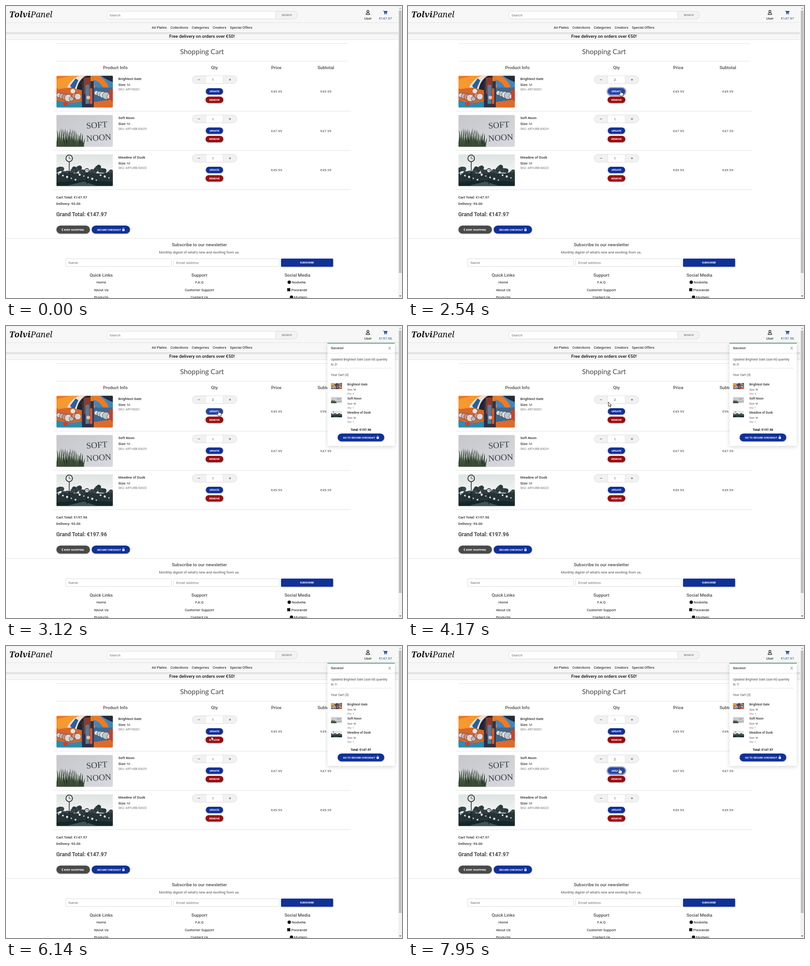
Animation of 871 by 643 pixels, one loop 8000 ms. Source, as an HTML page:

```html
<!DOCTYPE html>
<html lang="en">
<head>
<meta charset="utf-8">
<title>Shopping cart</title>
<style>
html, body { margin: 0; width: 100%; height: 100%; overflow: hidden; background: #fff; }
svg { display: block; }
#stage { width: 871px; height: 643px; }
text { font-family: Roboto, sans-serif; fill: #4a4a4a; }
.b { font-weight: 700; }
.m { font-weight: 500; }
.k { fill: #111; }
.s { fill: #777; }
.w { fill: #fff; font-weight: 700; }
.link { fill: #1b50a6; }
.lift { filter: drop-shadow(0 1px 1.2px rgba(0, 0, 0, .35)); }
.blue { fill: #10309a; }
.red { fill: #9c0a0c; }
.blue.hot { fill: #2446a6; }
.red.hot { fill: #8a0709; }
.blue.ring { fill: #2446a6; stroke: #8b9bd0; stroke-width: 4.4; paint-order: stroke; }
.step { fill: #f1f1f1; }
.step.hot { fill: #dedede; }
.toast { filter: drop-shadow(0 2px 4px rgba(0, 0, 0, .16)); }
/* Without the scrollbar, centred parts move by half its width. */
.wide .mid { transform: translateX(4px); }
.wide .side { transform: translateX(8px); }
.wide #bar { display: none; }
</style>
</head>
<body>
<svg id="stage" viewBox="0 0 871 643" xmlns="http://www.w3.org/2000/svg"></svg>
<script>
const LOOP = 8000, TICK = 78.6, PITCH = 86.5;
const stage = document.getElementById('stage');

// Text placed by the middle of its capitals.
const T = (x, y, str, { size = 7.9, cls = '', anchor = 'start', id = '', more = '' } = {}) =>
  `<text x="${x}" y="${(y + size * .355).toFixed(2)}" font-size="${size}" class="${cls}" id="${id}" text-anchor="${anchor}" ${more}>${str}</text>`;
const C = (x, y, str, opt = {}) => T(x, y, str, { ...opt, anchor: 'middle' });
const R = (x, y, w, h, fill, more = '') =>
  `<rect x="${x}" y="${y}" width="${w}" height="${h}" fill="${fill}" ${more}/>`;
const P = (d, fill, more = '') => `<path d="${d}" fill="${fill}" ${more}/>`;
const O = (x, y, r, fill, more = '') => `<circle cx="${x}" cy="${y}" r="${r}" fill="${fill}" ${more}/>`;
const G = (cls, body) => `<g class="${cls}">${body}</g>`;
const line = (x, y, w, color = '#e2e2e2') => R(x, y, w, 1, color);
const pill = (x, y, w, h, cls, id = '', r = h / 2) =>
  `<rect x="${x}" y="${y}" width="${w}" height="${h}" rx="${r}" class="${cls}" id="${id}"/>`;
const caps = { size: 5.8, cls: 'w' };
const photo = (n, x, y, w, h) => `<svg x="${x}" y="${y}" width="${w}" height="${h}" viewBox="0 0 124 70" preserveAspectRatio="none"><use href="#photo${n}"/></svg>`;
const lock = (x, y) => R(x, y, 5, 3.8, '#fff', 'rx=".6"') +
  P(`M${x + 1} ${y}v-1.2a1.5 1.5 0 0 1 3 0v1.2`, 'none', 'stroke="#fff" stroke-width=".9"');

const items = [
  { name: 'Brightest Gate', sku: 'ART-00001', price: '49.99' },
  { name: 'Soft Noon', sku: 'ART-URB-00029', price: '47.99' },
  { name: 'Meadow of Dusk', sku: 'ART-URB-00023', price: '49.99' }
];

function mural() {
  const blobs = (x, y, n, tints) => Array.from({ length: n }, (_, i) =>
    O(x + i * 7, y + i * 11 % 9 - 4, 5 + i * 5 % 4, tints[i % tints.length], 'stroke="#3c3a48" stroke-width=".8"')).join('');
  return R(0, 0, 124, 70, '#ec7a22') +
    P('M0 8L32 0H62L30 30L10 34L0 26Z', '#f6992f') +
    P('M24 24Q36 4 52 0H62Q48 14 46 34L30 40Z', '#e9e4dd') +
    P('M44 32Q48 8 66 0H76L60 36Z', '#23262d') +
    P('M30 22L42 6L48 10L38 34Z', '#26629f') +
    P('M78 0H124V30L88 34Z', '#3f86bd') +
    P('M80 0H92Q110 8 116 30L104 32Q100 14 80 8Z', '#f4791c') +
    P('M98 0H124V14Q112 10 98 0Z', '#252b3a') +
    P('M0 30L30 26L56 32V70H0Z', '#d5662f') +
    R(56, 12, 26, 58, '#2c3346') + R(60, 4, 15, 36, '#863d2e') +
    R(64, 20, 8, 42, '#4f7fa6') + R(73, 28, 6, 34, '#d95428') +
    P('M82 26H124V70H82Z', '#3d6a91') +
    P('M0 54Q30 64 56 56V70H0Z', '#2d8bad') + P('M82 58L124 52V70H82Z', '#e0692b') +
    blobs(5, 47, 7, ['#e0d4d0', '#c9b3b3', '#d98a68']) + blobs(88, 42, 5, ['#dfe1df', '#bcc7cd']) +
    O(36, 34, 5, '#e8e5e2') + O(70, 48, 4, '#e8c1a4') + O(20, 62, 5, '#cf3f2c') +
    P('M116 32L124 28V58L116 50Z', '#cc4126');
}

function wall() {
  let blades = '';
  for (let i = 0; i < 60; i++) {
    const x = i, h = 22 + (i * 37 % 17) - Math.max(0, i - 36) * .55;
    blades += P(`M${x - 1.5} 70Q${x - 1} ${70 - h * .6} ${x + i * 7 % 9 - 4} ${66 - h}Q${x + 2} ${70 - h * .5} ${x + 1.5} 70Z`,
      ['#2f4030', '#5b6b4a', '#1c2a22', '#455739'][i % 4]);
  }
  const word = (x, y, s) => `<text x="${x}" y="${y}" font-size="19" style="font-family:'Liberation Serif',serif;fill:#36424c" transform="rotate(-4 ${x} ${y})">${s}</text>`;
  return R(0, 0, 124, 70, 'url(#plaster)') + blades + word(66, 30, 'SOFT') + word(66, 58, 'NOON');
}

function meadow() {
  let trees = '', faces = '';
  for (let i = 0; i < 42; i++)
    trees += O(i * 3, 42 - 6 * Math.sin(i * .42 + 1.2) - (i * 29 % 9), 5, i % 2 ? '#2b383b' : '#3a484b');
  for (let i = 0; i < 13; i++)
    faces += O(5 + i * 9.2, 44 + i * 31 % 14, 1.4 + i % 3 * .5, '#dfe6e4');
  const clock = (x, y, r) => R(x - .7, y, 1.5, 66 - y, '#1a2224') +
    O(x, y, r, '#dfe4e2', 'stroke="#252c2e" stroke-width="1.7"') +
    P(`M${x} ${y - r * .6}V${y}L${x + r * .5} ${y + 1}`, 'none', 'stroke="#252c2e" stroke-width=".9"');
  return R(0, 0, 124, 70, 'url(#dusk)') + trees + R(0, 42, 124, 28, '#253337') +
    P('M0 62Q60 54 124 61V70H0Z', '#15272b') + P('M20 70L60 60L90 70Z', '#3f5355') +
    faces + clock(28, 9, 7.3) + clock(67, 36, 4.6);
}

const defs = `<defs>
  <linearGradient id="plaster" x2="1" y2="1"><stop stop-color="#c6c8cb"/><stop offset="1" stop-color="#d9d8de"/></linearGradient>
  <linearGradient id="dusk" x2="0" y2="1"><stop stop-color="#dde3e2"/><stop offset=".6" stop-color="#f3f5f3"/></linearGradient>
  <linearGradient id="shade" x2="0" y2="1"><stop stop-color="#000" stop-opacity=".12"/><stop offset="1" stop-color="#000" stop-opacity="0"/></linearGradient>
  <clipPath id="frame"><rect width="124" height="70" rx="2"/></clipPath>
  ${[mural, wall, meadow].map((draw, i) => `<g id="photo${i}" clip-path="url(#frame)">${draw()}</g>`).join('')}
</defs>`;

function backdrop() {
  const serif = `style="font-family:'Noto Serif',serif;font-style:italic"`;
  return R(0, 0, 871, 643, '#fff') + R(0, 0, 871, 74, '#f7f7f7') +
    line(0, 0, 871, '#e6e6e6') + line(0, 36, 871) +
    R(0, 58, 871, 6, 'url(#shade)') + line(0, 73.5, 871) + line(0, 511, 871) +
    T(7, 18, '<tspan font-weight="900">Tolvi</tspan>Panel', { size: 18.5, cls: 'k', more: serif });
}

function header() {
  const nav = [[320.5, 'All Plates'], [361.5, 'Collections'], [408.5, 'Categories'], [454.5, 'Creators'], [492.5, 'Special Offers']];
  return R(221.5, 11.5, 419.5, 17, '#fff', 'rx="8.5" stroke="#dcdcdc"') +
    P('M593.5 11.5H632.5a8.5 8.5 0 0 1 0 17H593.5Z', '#f3f3f3', 'stroke="#dcdcdc"') +
    T(227.5, 20, 'Search', { cls: 's' }) + C(617.5, 20.3, 'SEARCH', { size: 5.9, cls: 'm s' }) +
    nav.map(([x, s]) => T(x, 47.5, s, { cls: 'k' })).join('') +
    C(431, 66.2, 'Free delivery on orders over €50!', { size: 9.88, cls: 'm k' });
}

const account = () =>
  O(796, 11.6, 2.3, 'none', 'stroke="#111" stroke-width="1.1"') +
  P('M792 18.6q0-3.4 2.6-3.4h2.8q2.6 0 2.6 3.4z', 'none', 'stroke="#111" stroke-width="1.1"') +
  C(796, 26.8, 'User', { cls: 'k' }) +
  P('M829.5 10h1.8l.4 1H839l-1 4.3h-5.2l.2.8h4.8v.9h-5.6l-1.2-6H829.5Z', '#1b50a6') +
  O(833, 17.7, .9, '#1b50a6') + O(837, 17.7, .9, '#1b50a6') +
  C(834.5, 26.8, '', { cls: 'link', id: 'bag' });

function row(item, i) {
  const y = i * PITCH;
  return photo(i, 111, 153.5 + y, 124, 70) +
    T(247, 160 + y, item.name, { cls: 'b' }) +
    T(247, 172.7 + y, '<tspan class="b">Size:</tspan> M') +
    T(247, 184 + y, 'SKU: ' + item.sku, { size: 6.7, cls: 's' }) +
    `<path class="step" id="minus${i}" d="M439.5 ${153.5 + y}H418.3a8.7 8.7 0 0 0 0 17.4H439.5Z"/>` +
    `<path class="step" id="plus${i}" d="M477.5 ${153.5 + y}H499.3a8.7 8.7 0 0 1 0 17.4H477.5Z"/>` +
    R(409.5, 153.5 + y, 98.5, 17.4, 'none', 'rx="8.7" stroke="#dcdcdc" stroke-width=".9"') +
    R(439.5, 153.5 + y, 38, 17.4, '#fff', 'stroke="#e0e0e0" stroke-width=".9"') +
    P(`M422 ${162.3 + y}h4.8M490.2 ${162.3 + y}h4.8M492.6 ${159.9 + y}v4.8`, 'none', 'stroke="#555" stroke-width=".9"') +
    C(455, 162.3 + y, '1', { id: 'qty' + i }) +
    G('lift', pill(439.5, 181 + y, 38, 14, 'blue', 'update' + i) + pill(439, 199.5 + y, 39, 14, 'red', 'remove' + i)) +
    C(458.5, 188.2 + y, 'UPDATE', caps) + C(458.5, 206.7 + y, 'REMOVE', caps) +
    C(595, 188.3 + y, '€' + item.price) + C(703.5, 188.3 + y, '€' + item.price, { id: 'sub' + i }) +
    line(104, 231 + y, 654);
}

function cart() {
  const heads = [[240.5, 'Product Info'], [458.5, 'Qty'], [594.5, 'Price'], [703.5, 'Subtotal']];
  return line(111, 82, 641) + line(111, 121, 641) +
    C(431, 100, 'Shopping Cart', { size: 15.5, more: 'style="font-family:Lato,sans-serif"' }) +
    heads.map(([x, s]) => C(x, 136, s, { size: 9.8, cls: 'm' })).join('') +
    items.map(row).join('') +
    T(110.5, 421.5, '', { cls: 'b', id: 'cartTotal' }) +
    T(110.5, 434.9, 'Delivery: €0.00', { cls: 'b' }) +
    T(110.5, 458.3, '', { size: 11.86, cls: 'b', id: 'grand' }) +
    G('lift', R(111, 483.5, 73.5, 17.6, '#4a4a4a', 'rx="8.8"') + pill(188.5, 483.5, 84.2, 17.6, 'blue')) +
    P('M125.2 490l-2.4 2.5l2.4 2.5', 'none', 'stroke="#fff" stroke-width="1.1"') +
    T(127.5, 492.6, 'KEEP SHOPPING', caps) +
    T(200.3, 492.6, 'SECURE CHECKOUT', caps) + lock(255.8, 491.6);
}

function footer() {
  const cols = [
    [209.5, 'Quick Links', 'Home', 'About Us', 'Products'],
    [425.3, 'Support', 'F.A.Q', 'Customer Support', 'Contact Us'],
    [641, 'Social Media']
  ];
  const social = [[628.5, 'Nodvella'], [627.5, 'Pixorande'], [633.5, 'Murbelo']];
  const field = (x, s) => R(x, 556.5, 232.5, 17.2, '#fff', 'rx="1.5" stroke="#dcdcdc"') + T(x + 6, 565.2, s, { cls: 's' });
  return C(425.3, 525.8, 'Subscribe to our newsletter', { size: 9.88, cls: 'm' }) +
    C(425.3, 541.8, "Monthly digest of what's new and exciting from us.") +
    field(131.5, 'Name') + field(368.5, 'Email address') +
    G('lift', pill(605, 556.3, 114.5, 17.6, 'blue', '', 1.5)) +
    C(662, 565.4, 'SUBSCRIBE', caps) +
    cols.map(([x, title, ...links]) => C(x, 592.2, title, { size: 9.8, cls: 'm' }) +
      links.map((s, i) => C(x, 608.2 + i * 16.5, s, { cls: 'k' })).join('')).join('') +
    social.map(([x, s], i) => {
      const y = 608.2 + i * 16.5;
      return T(x, y, s, { cls: 'k' }) + (i === 1 ? R(x - 9, y - 3.4, 6.8, 6.8, '#111') : O(x - 5.5, y, 3.7, '#111'));
    }).join('');
}

const scrollbar = () => '<g id="bar">' + R(863, 0, 8, 643, '#f1f1f1') + R(864, 10, 6, 578, '#bfbfbf') +
  P('M864.8 6.5h4.4l-2.2-2.8z', '#9a9a9a') + P('M864.8 637.5h4.4l-2.2 2.8z', '#505050') + '</g>';

function toast() {
  return '<g id="toast">' + G('toast', R(707, 37.5, 148, 226.5, '#fff', 'rx="1.5"')) +
    R(707, 37.3, 148, 1.4, '#2b8d63') + line(707, 59.5, 148) +
    T(714.7, 48.3, 'Success!', { size: 6.9, cls: 'b' }) +
    P('M840.8 45.8l6 6m0-6l-6 6', 'none', 'stroke="#666" stroke-width=".9"') +
    T(714.7, 73.4, `Updated ${items[0].name} (size M) quantity`, { size: 6.9 }) +
    T(714.7, 84.9, '', { size: 6.9, id: 'note' }) + line(715, 92.5, 133) +
    T(714.7, 108, '', { size: 6.9, id: 'count' }) +
    items.map((it, i) => {
      const y = i * 30.8;
      return photo(i, 714.7, 125.5 + y, 24.6, 13.8) +
        T(750.7, 129 + y, it.name, { size: 6.9, cls: 'b' }) +
        T(750.7, 140 + y, 'Size: M', { size: 5.9 }) +
        T(750.7, 149.4 + y, 'Qty: 1', { size: 5.9, cls: 's', id: 'mini' + i });
    }).join('') +
    C(780.7, 228.3, '', { size: 6.9, cls: 'b k', id: 'toastTotal' }) +
    G('lift', pill(729.5, 236.7, 102.5, 17.3, 'blue')) +
    T(741.3, 245.6, 'GO TO SECURE CHECKOUT', caps) + lock(815.2, 244.6) + '</g>';
}

const pointer = `<g id="cursor" stroke="#111" stroke-width=".9" stroke-linejoin="round" fill="#fff">
  <path id="arrow" d="M0 0V9.5L2.2 7.5L3.8 11L5.3 10.3L3.8 7H6.8Z"/>
  <path id="hand" d="M-1 .8a1 1 0 0 1 2 0V4.2l1.6.2l1.5.4l1.4.6q.7.3.6 1.4l-.9 4.8H-.9L-3.6 7.6q-.5-1 .4-1.3q.8-.2 2.2 1.3Z"/>
</g>`;

stage.innerHTML = defs + backdrop() + G('mid', header() + cart() + footer()) +
  G('side', account() + toast()) + scrollbar() + pointer;

const el = {};
stage.querySelectorAll('[id]').forEach(n => { if (n.id) el[n.id] = n; });

const zones = items.flatMap((_, i) => [
  ['minus' + i, 409, 153.5, 30, 17.5], ['plus' + i, 477, 153.5, 31, 17.5],
  ['update' + i, 439.5, 181, 38, 14], ['remove' + i, 439, 199.5, 39, 14]
].map(([id, x, y, w, h]) => ({ id, x, y: y + i * PITCH, w, h })));

// Pointer stops: time, x, y.
const path = [
  [80, 838, 11], [940, 499.5, 167], [1100, 499, 164.5], [1270, 495.5, 163.5], [1830, 495.5, 163.5],
  [2070, 467.5, 186.5], [3770, 467.5, 186.5], [4400, 428.5, 159], [4640, 428.5, 159], [4870, 448, 182.5],
  [5180, 447.5, 182.5], [5900, 449, 183.5], [6130, 451.5, 199], [6530, 487, 249.5], [6920, 487, 250],
  [7240, 475, 267.5], [7320, 475, 267.5], [7540, 477, 259.5], [7780, 465, 269.5]
];

// Shading of a step button: from arrival until just after the click.
const shaded = { plus0: [940, 1670], minus0: [4400, 4720], plus1: [6530, 6840] };

function pointerAt(t) {
  const i = path.findIndex(p => p[0] > t);
  if (i < 0) return path[path.length - 1].slice(1);
  if (i === 0) return path[0].slice(1);
  const [t0, x0, y0] = path[i - 1], [t1, x1, y1] = path[i];
  const k = (t - t0) / (t1 - t0), e = k * k * (3 - 2 * k);
  return [x0 + (x1 - x0) * e, y0 + (y1 - y0) * e];
}

const within = (t, [a, b]) => t >= a && t < b;
const say = (id, s) => { if (el[id].textContent !== s) el[id].textContent = s; };

function render(t) {
  const two = within(t, [2950, 5580]), total = two ? '€197.96' : '€147.97', n = two ? 2 : 1;
  say('bag', total);
  say('cartTotal', 'Cart Total: ' + total);
  say('grand', 'Grand Total: ' + total);
  say('toastTotal', 'Total: ' + total);
  say('sub0', two ? '€99.98' : '€49.99');
  say('note', `to ${n}!`);
  say('count', `Your Cart (${n + 2})`);
  say('mini0', 'Qty: ' + n);
  say('qty0', within(t, [1580, 4560]) ? '2' : '1');
  say('qty1', t >= 6680 ? '2' : '1');
  el.toast.style.display = t < 2950 ? 'none' : '';
  stage.classList.toggle('wide', within(t, [2950, 3120]));

  const [x, y] = pointerAt(Math.floor((t + 5) / TICK) * TICK);
  const over = zones.find(z => x >= z.x && x < z.x + z.w && y >= z.y && y < z.y + z.h);
  for (const z of zones) {
    const isStep = el[z.id].classList.contains('step');
    el[z.id].classList.toggle('hot', isStep ? within(t, shaded[z.id] || [0, 0]) : z === over);
  }
  el.update0.classList.toggle('ring', within(t, [2380, 2950]) || within(t, [5100, 5580]));
  el.update1.classList.toggle('ring', t >= 7870);

  el.cursor.setAttribute('transform', `translate(${x.toFixed(1)} ${y.toFixed(1)})`);
  el.cursor.style.display = t < 160 ? 'none' : '';
  el.hand.style.display = over ? '' : 'none';
  el.arrow.style.display = over ? 'none' : '';
}

const start = performance.now();
function loop() {
  render((performance.now() - start) % LOOP);
  requestAnimationFrame(loop);
}
loop();
</script>
</body>
</html>
```
